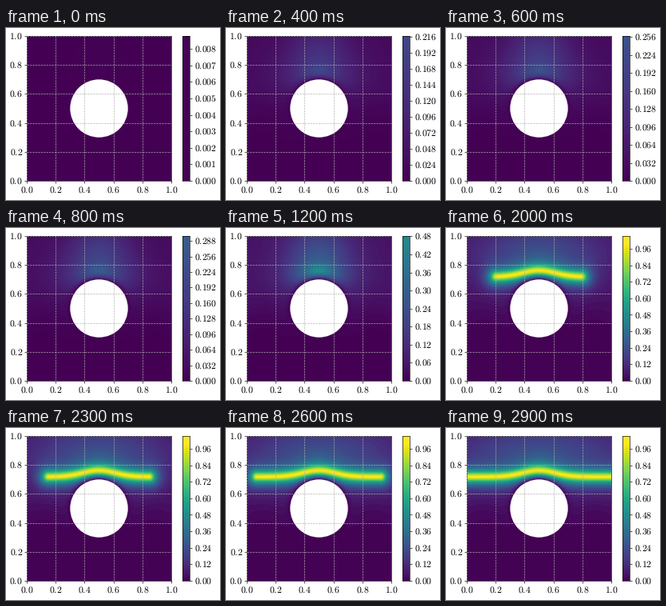
These frames come from a looping animation (268 by 215 pixels, 3000 ms). A matplotlib script:

```python
import math

import matplotlib.pyplot as plt
import numpy as np
from matplotlib.animation import FuncAnimation
from matplotlib.patches import Circle

W, H, DPI = 268, 215, 64
FRAMES, INTERVAL = 30, 100
PX = 72 / DPI  # points per pixel

plt.rcParams.update({
    "mathtext.fontset": "cm",
    "text.hinting": "none",
    "axes.linewidth": 0.65 * PX,
})

# Peak damage and half length of the crack over the frames
PEAK_AT = [0, 1, 2, 3, 4, 8, 12, 13, 14, 15, 16]
PEAK = [0.00878, 0.035, 0.079, 0.14, 0.217, 0.298, 0.481, 0.62, 0.86, 1.02, 1.053]
HALF_AT = [11, 12, 13, 14, 15, 16, 20, 23, 26, 29]
HALF = [0, 0.015, 0.06, 0.13, 0.19, 0.235, 0.295, 0.35, 0.43, 0.55]
TICK_BASES = (1, 1.2, 1.6, 2, 2.4, 3.2, 4, 4.8, 6, 8, 10)

N = 362
RADIUS = 0.2
grid = (np.arange(N) + 0.5) / N
X, Y = np.meshgrid(grid, grid)
DX = np.abs(X - 0.5)
PATH = 0.72 + 0.043 * np.exp(-((X - 0.5) / 0.16) ** 2)
SHOULDER = 0.42 + 0.07 * np.exp(-((DX - 0.38) / 0.12) ** 2)
BASE = 1 / (1 + np.exp(-(Y - SHOULDER) / 0.07))
# Damage vanishes on the rim of the hole
RIM = np.tanh(np.maximum(np.hypot(DX, Y - 0.5) - RADIUS, 0) / 0.025)


def tick_step(top):
    """Smallest allowed step that gives at most nine intervals and a half."""
    scale = 10.0 ** math.floor(math.log10(top / 9.5))
    return next(b * scale for b in TICK_BASES if top / (b * scale) <= 9.5)


def decimals(step):
    return next(n for n in range(1, 7) if abs(step - round(step, n)) < 1e-9)


def banded(values, step):
    return (np.floor(values / step) + 0.5) * step


def damage(top, half):
    peak = min(top, 1)
    spread = -(DX / (0.22 + 0.7 * half)) ** 2 - ((Y - 0.88) / 0.2) ** 2
    far = min(0.45 * top, 0.18) * np.exp(spread) + min(0.1 * top, 0.05) * BASE
    grown = min(half / 0.12, 1)
    ahead = np.maximum(DX - half, 0) / (2.1 - 1.1 * grown)
    dist = np.hypot(Y - PATH, ahead)
    length = np.interp(top, [0.2, 0.48, 1], [0.075, 0.055, 0.036])
    near = np.exp(-(np.hypot(dist, 0.017) - 0.017) / length)
    return RIM * (far + (peak - far) * near)


def add_axes(x, y, w, h):
    return fig.add_axes([x / W, 1 - (y + h) / H, w / W, h / H])


def style_ticks(ax, axis, pad):
    ax.tick_params(axis=axis, length=2.8 * PX, width=0.65 * PX,
                   pad=pad * PX, labelsize=11.7 * PX)


fig = plt.figure(figsize=(W / DPI, H / DPI), dpi=DPI, facecolor="white")
ax = add_axes(26, 10, 181, 181)
bar = add_axes(221.2, 10, 9, 181)
look = dict(cmap="viridis", vmin=0, vmax=1, origin="lower",
            interpolation="nearest", aspect="auto")

field = ax.imshow(np.zeros((N, N)), extent=(0, 1, 0, 1), **look)
ax.add_patch(Circle((0.5, 0.5), RADIUS, facecolor="white", edgecolor="none", zorder=1))
marks = np.linspace(0, 1, 6)
names = [f"${v:.1f}$" for v in marks]
ax.set_xticks(marks, names)
ax.set_yticks(marks, names)
ax.set_axisbelow(False)
ax.grid(True, linestyle="--", color="#b0b0b0", linewidth=0.65 * PX)
style_ticks(ax, "x", 3.3)
style_ticks(ax, "y", 2.3)

ramp = bar.imshow(np.zeros((N, 1)), extent=(0, 1, 0, 1), **look)
bar.set_xticks([])
bar.yaxis.tick_right()
style_ticks(bar, "y", 2.8)


def update(i):
    top = np.interp(i, PEAK_AT, PEAK)
    half = np.interp(i, HALF_AT, HALF)
    step = tick_step(top)
    field.set_data(banded(damage(top, half), step / 8))
    ramp.set_data(banded(grid * top, step / 8)[:, None])
    ramp.set_extent((0, 1, 0, top))
    bar.set_ylim(0, top)
    ticks = np.arange(0, top + 1e-9, step)
    digits = decimals(step)
    bar.set_yticks(ticks, [f"${v:.{digits}f}$" for v in ticks])
    return field, ramp


anim = FuncAnimation(fig, update, frames=FRAMES, interval=INTERVAL,
                     init_func=lambda: update(0), repeat=True, repeat_delay=0)
plt.show()
```
